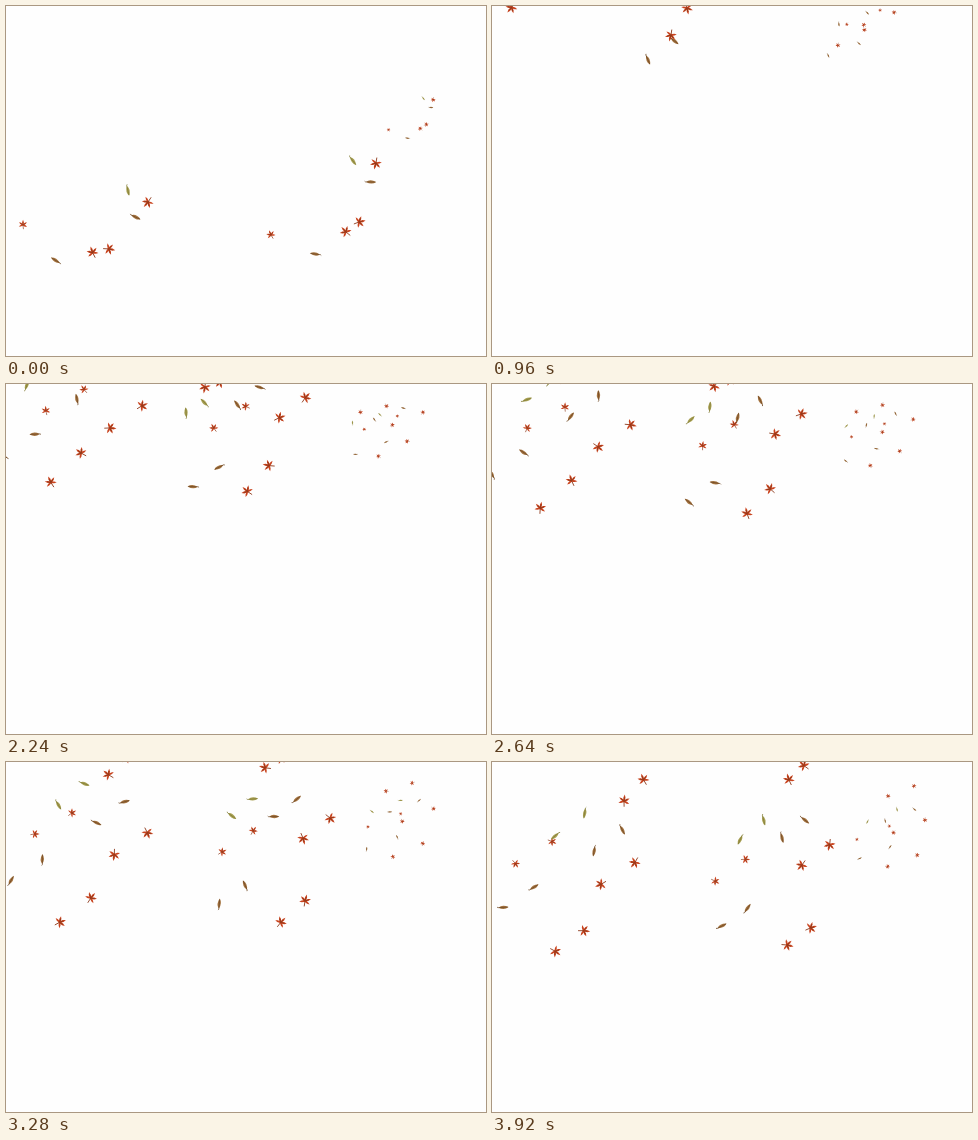
Recreate the animation shown at these times as an HTML page. Size 480 px wide and 350 px high, loop 4000 ms.

```html
<!DOCTYPE html>
<html lang="en">
<head>
<meta charset="utf-8">
<title>Drifting leaves</title>
<style>
  html, body { margin: 0; width: 100%; height: 100%; overflow: hidden; background: #fefefe; }
  svg { display: block; width: 480px; height: 350px; }
</style>
</head>
<body>
<svg id="stage" viewBox="0 0 480 350" width="480" height="350"></svg>
<script>
const NS = "http://www.w3.org/2000/svg";
const stage = document.getElementById("stage");
const LOOP = 4000, STEP = 80;

// One swarm of seven leaves. Each path is a cubic through four key points.
const KEYS = [0.96, 1.6, 2.96, 3.92];
const SWARM = [
  { kind: "brown", size: 5.8, phase: -20, spin: 90, born: 0.1, path: [[156, 54], [171, 78], [205, 130], [230, 164]], low: [309, 248] },
  { kind: "maple", size: 6.4, phase: 20, spin: 90, born: 0.2, path: [[179, 29], [215, 69], [265, 146], [295, 183]], low: [340, 226] },
  { kind: "maple", size: 4.9, phase: 40, spin: 90, born: 0.3, path: [[200, -20], [204, 14], [213, 76], [223, 119]], low: [265, 229] },
  { kind: "brown", size: 5.8, phase: -35, spin: 120, born: 0.4, path: [[181, -20], [207, 0], [257, 44], [290, 76]], low: [365, 176] },
  { kind: "maple", size: 6.4, phase: 140, spin: 90, born: 0.5, path: [[240, -18], [257, 8], [290, 63], [310, 103]], low: [353, 216] },
  { kind: "olive", size: 5.8, phase: -15, spin: 125, born: 1, path: [[115, 34], [148, 25], [213, 44], [248, 78]], low: [347, 155] },
  { kind: "maple", size: 6.4, phase: 260, spin: 90, born: 1.1, path: [[118, 16], [160, 8], [241, 3], [297, 18]], low: [370, 157] }
];

// The swarm is seen three times, and each view has a delayed, shifted echo.
const VIEWS = [
  { x: -132, y: -98, turn: 24, scale: 1 },
  { x: 0, y: 0, turn: 0, scale: 1 },
  { x: 270, y: 26.7, turn: 0, scale: 0.425 }
];
const ECHO = { delay: 0.32, x: 34, y: -7 };

// The previous swarm leaves with a steady drift.
const LATE = { age: 6.3, end: 0.4, vx: 22, vy: 46 };

const COLORS = {
  maple: ["#c9441f", "#8e3a1c"],
  brown: ["#a4733f", "#704a26"],
  olive: ["#a8a052", "#837d38"]
};

function add(parent, tag, attrs) {
  const el = document.createElementNS(NS, tag);
  for (const key in attrs) el.setAttribute(key, attrs[key]);
  parent.appendChild(el);
  return el;
}

// Five pointed lobes fanning out from the stem, which points along -x
function mapleShape() {
  const polar = (deg, r) => {
    const a = deg * Math.PI / 180;
    return (r * Math.cos(a)).toFixed(3) + " " + (r * Math.sin(a)).toFixed(3);
  };
  let d = "M" + polar(-150, 0.2);
  for (let i = -2; i <= 2; i++) {
    const deg = i * 56, r = 1.05 - 0.07 * Math.abs(i);
    d += "L" + polar(deg - 15, r * 0.6) + "L" + polar(deg, r)
       + "L" + polar(deg + 15, r * 0.6) + "L" + polar(deg + 28, 0.3);
  }
  return d + "L" + polar(150, 0.2) + "Z";
}

const SHAPES = {
  maple: { body: mapleShape(), veins: "M-.85 .12L0 0H.6M0 0L.35 .5M0 0L.35 -.5" },
  blade: { body: "M-.85 0Q-.15 -.6 .9 0Q.1 .55 -.85 0Z", veins: "M-1.1 -.12Q-.95 .05 -.8 0H.75" }
};

function makeLeaf(kind) {
  const g = add(stage, "g", {});
  const shape = SHAPES[kind] || SHAPES.blade;
  const [fill, dark] = COLORS[kind];
  add(g, "path", { d: shape.body, fill });
  add(g, "path", { d: shape.veins, fill: "none", stroke: dark, "stroke-width": 0.13 });
  return g;
}

// Point at time t on the polynomial through all key points
function along(path, t) {
  const p = [0, 0];
  path.forEach((point, i) => {
    let w = 1;
    KEYS.forEach((k, j) => { if (j !== i) w *= (t - k) / (KEYS[i] - k); });
    p[0] += w * point[0];
    p[1] += w * point[1];
  });
  return p;
}

// Before the first key the leaf comes in on a straight line.
function fall(path, t) {
  const t0 = KEYS[0];
  if (t >= t0) return along(path, t);
  const k = (t - t0) / (KEYS[1] - t0);
  return path[0].map((v, i) => v + (path[1][i] - v) * k);
}

const drift = ([x, y], t) => [x + LATE.vx * t, y + LATE.vy * t];

const parts = [];
for (const view of VIEWS) {
  for (const leaf of SWARM) {
    const put = opts => parts.push({ el: makeLeaf(leaf.kind), view, leaf, dx: 0, dy: 0, ...opts });
    put({ from: 0, to: LATE.end, age: t => t + LATE.age, pos: t => drift(leaf.low, t) });
    put({ from: leaf.born, to: 4, age: t => t, pos: t => fall(leaf.path, t) });
    put({
      from: leaf.born + ECHO.delay, to: 4, dx: ECHO.x, dy: ECHO.y,
      age: t => t - ECHO.delay, pos: t => fall(leaf.path, t - ECHO.delay)
    });
  }
}

function draw(t) {
  for (const { el, view, leaf, dx, dy, from, to, age, pos } of parts) {
    const on = t >= from && t < to;
    el.setAttribute("visibility", on ? "visible" : "hidden");
    if (!on) continue;
    const [x, y] = pos(t);
    const angle = leaf.phase + leaf.spin * age(t);
    el.setAttribute("transform",
      `translate(${view.x + dx} ${view.y + dy}) rotate(${view.turn}) scale(${view.scale}) ` +
      `translate(${x.toFixed(2)} ${y.toFixed(2)}) rotate(${angle.toFixed(1)}) scale(${leaf.size})`);
  }
}

function tick() {
  const ms = performance.now() % LOOP;
  draw(Math.floor(ms / STEP) * STEP / 1000);
  requestAnimationFrame(tick);
}
tick();
</script>
</body>
</html>
```
